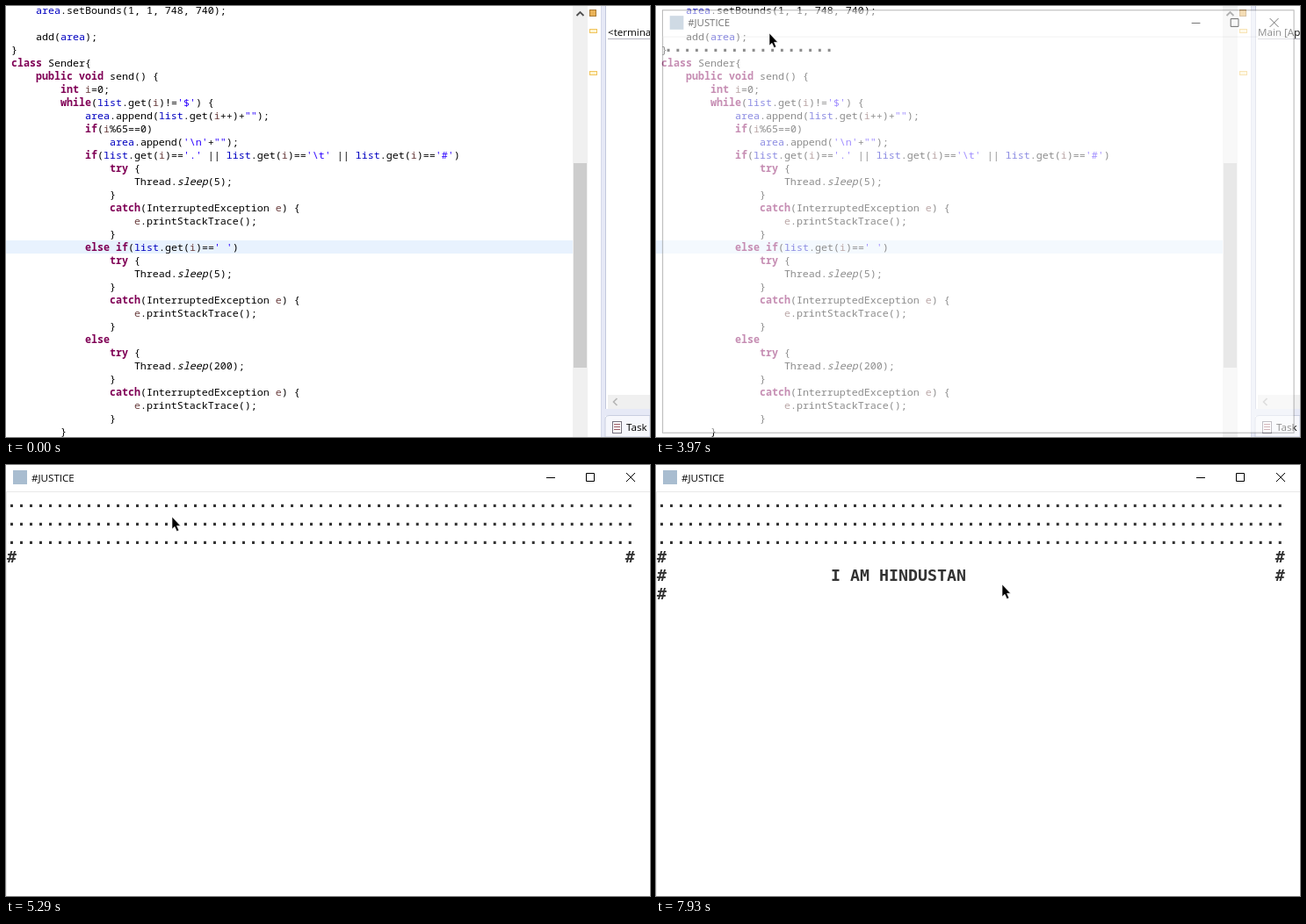
Write an HTML page that moves like this. It is 733x491 px and loops after 8 s.

```html
<!DOCTYPE html>
<html lang="en">
<head>
<meta charset="utf-8">
<title>Code run</title>
<style>
html, body { margin: 0; width: 100%; height: 100%; overflow: hidden; background: #fff; }
svg { display: block; width: 100%; height: 100%; }
text { white-space: pre; }
.code { font: 11.667px "Noto Sans Mono", "DejaVu Sans Mono", monospace; }
.key { font-weight: 700; fill: #7f0055; }
.str { fill: #2a00ff; }
.field { fill: #0000c0; }
.local { fill: #6a3e3e; }
.call { font-style: italic; }
.ui { font: 11.6px "Open Sans", "Noto Sans", sans-serif; }
.out { font: bold 18.27px "DejaVu Sans Mono", monospace; fill: #333; }
</style>
</head>
<body>
<svg viewBox="0 0 733 491" preserveAspectRatio="none">
  <rect width="733" height="491" fill="#fff"/>
  <rect y="267" width="645" height="15" fill="#e8f2fe"/>
  <g id="code" class="code"></g>
  <rect id="caret" x="125" y="267" width="2" height="15"/>

  <!-- editor scrollbar and ruler -->
  <rect x="645" width="17" height="491" fill="#f0f0f0"/>
  <rect x="646" y="179" width="15" height="233" fill="#cdcdcd"/>
  <path d="M649.5 11L653.5 7L657.5 11" fill="none" stroke="#505050" stroke-width="1.8"/>
  <rect x="664.5" y="4.5" width="7" height="7" fill="#eab358" stroke="#a87a35"/>
  <g fill="#fdf3cf" stroke="#f0c45c">
    <rect x="664.5" y="26.5" width="8" height="4"/>
    <rect x="664.5" y="74.5" width="8" height="4"/>
  </g>

  <!-- console and task panes -->
  <rect x="677" width="5" height="491" fill="#e6e9f6"/>
  <path d="M677.5 0V491" stroke="#d5d9ea"/>
  <path d="M682.5 0V460" stroke="#c3c8dc"/>
  <rect x="682" y="459" width="51" height="8" fill="#e6e9f6"/>
  <path d="M682 491V471Q682 466.500 687 466.500H733V491Z" fill="#f6f7fc" stroke="#c9cee0"/>
  <g id="console">
    <path d="M685 37.500H733" stroke="#b3b3bd"/>
    <rect x="685" y="443" width="48" height="16" fill="#f0f0f0"/>
    <path d="M695.500 447L691.500 451L695.500 455" fill="none" stroke="#b5b5b5" stroke-width="1.6"/>
  </g>
  <text id="label" class="ui" x="685"></text>
  <rect x="690.5" y="473.5" width="10" height="13" fill="#fff" stroke="#75707d"/>
  <path d="M692 476.500H699M692 479.500H699M692 482.500H699" stroke="#9a5a62"/>
  <text class="ui" x="706" y="484">Task</text>

  <g id="win">
    <rect x="-.5" y="-.5" width="734.500" height="492" fill="#fff" stroke="#777"/>
    <path d="M0 30.500H733M.5 30V491" fill="none" stroke="#e9e9e9"/>
    <rect x="8" y="6" width="16" height="16" fill="#a9bdd0"/>
    <text class="ui" x="29" y="18.500">#JUSTICE</text>
    <path d="M615 14.500H625M660.500 9.500H669.500V18.500H660.500ZM706 9L716 19M716 9L706 19" fill="none" stroke="#000"/>
    <g id="out" class="out"></g>
  </g>

  <path id="beam" d="M1 .5H3.500L4.500 1.500L5.500 .5H8M4.500 1V16M1 16.500H3.500L4.500 15.500L5.500 16.500H8" fill="none" stroke="#000"/>
  <path id="arrow" d="M0 0V14L3 11.300L5.400 16.500L7.800 15.500L5.500 10.300H9.600Z" stroke="#fff" stroke-width=".6"/>
</svg>
<script>
const LOOP = 8000, START = 650, TICK = 77.4, OPEN = 3970;
const $ = id => document.getElementById(id);
const NS = 'http://www.w3.org/2000/svg';
const add = (parent, tag, attrs, text = '') => {
  const el = parent.appendChild(document.createElementNS(NS, tag));
  for (const k in attrs) el.setAttribute(k, attrs[k]);
  el.textContent = text;
  return el;
};
const clamp = (v, lo, hi) => Math.min(hi, Math.max(lo, v));

const SOURCE = String.raw`    area.setBounds(1, 1, 748, 740);

    add(area);
}
class Sender{
    public void send() {
        int i=0;
        while(list.get(i)!='$') {
            area.append(list.get(i++)+"");
            if(i%65==0)
                area.append('\n'+"");
            if(list.get(i)=='.' || list.get(i)=='\t' || list.get(i)=='#')
                try {
                    Thread.sleep(5);
                }
                catch(InterruptedException e) {
                    e.printStackTrace();
                }
            else if(list.get(i)==' ')
                try {
                    Thread.sleep(5);
                }
                catch(InterruptedException e) {
                    e.printStackTrace();
                }
            else
                try {
                    Thread.sleep(200);
                }
                catch(InterruptedException e) {
                    e.printStackTrace();
                }
        }`;

const TOKEN = /(?<str>'\\?.'|"[^"]*")|(?<key>\b(?:class|public|void|int|while|if|else|try|catch)\b)|(?<field>\b(?:area|list)\b)|(?<local>\b[ie]\b)|(?<call>\bsleep\b)/g;

SOURCE.split('\n').forEach((line, row) => {
  const text = add($('code'), 'text', { x: 6, y: 9 + 15 * row });
  let at = 0;
  for (const m of line.matchAll(TOKEN)) {
    const kind = Object.keys(m.groups).find(k => m.groups[k] !== undefined);
    text.append(line.slice(at, m.index));
    add(text, 'tspan', { class: kind }, m[0]);
    at = m.index + m[0].length;
  }
  text.append(line.slice(at));
});

// Printed characters after the dots: time, row, column, character
const prints = [[4970, 3, 0, '#'], [5290, 3, 64, '#'], [5370, 4, 0, '#']];
const letterTimes = [5600, 5750, 5980, 6210, 6380, 6610, 6760, 6990, 7160, 7390, 7540, 7770];
let nextLetter = 0;
[...'I AM HINDUSTAN'].forEach((ch, i) => {
  if (ch !== ' ') prints.push([letterTimes[nextLetter++], 4, 18 + i, ch]);
});
prints.push([7930, 4, 64, '#'], [7930, 5, 0, '#']);

const rows = Array.from({ length: 6 }, (_, r) => add($('out'), 'text', { x: 1, y: 48 + 21 * r }));

const beamPath = [[650, 621, 438], [1110, 484, 273], [1430, 447, 240], [1730, 190, 1]];
const arrowPath = [[3970, 127, 30], [4430, 189, 62], [5289, 189, 62], [5290, 189, 59],
  [6529, 189, 59], [6530, 190, 59], [6990, 275, 84], [7159, 275, 84], [7930, 394, 136]];

function along(path, t) {
  const i = path.findIndex(p => p[0] > t);
  if (i < 0) return path[path.length - 1].slice(1);
  if (i === 0) return path[0].slice(1);
  const [t0, x0, y0] = path[i - 1], [t1, x1, y1] = path[i];
  const u = (t - t0) / (t1 - t0), e = u * (2 - u) * .4 + u * .6;
  return [x0 + (x1 - x0) * e, y0 + (y1 - y0) * e];
}

const show = (el, on) => el.setAttribute('visibility', on ? 'visible' : 'hidden');
function place(id, path, t, on) {
  const [x, y] = along(path, t).map(Math.round);
  $(id).setAttribute('transform', `translate(${x} ${y})`);
  show($(id), on);
}

function dotsAt(t) {
  const ticks = (t - OPEN) / TICK;
  return Math.round(ticks < 6 ? 16 + 91 * ticks / 6 : 107 + 14 * (ticks - 6));
}

function render(t) {
  // The screen refreshes in steps
  const step = Math.floor((t - START) / TICK + .2);
  const q = START + TICK * step;

  show($('caret'), t >= 3270 && t < 3820);
  place('beam', beamPath, q, (t >= 650 && t < 1110) || (t >= 1110 && t < 1800));
  if (t >= 1110 && t < 1430) place('beam', beamPath, 1110, true);

  const empty = t >= 3420 && t < 3650;
  show($('console'), !empty);
  $('label').textContent = empty ? 'No consoles' : t < 3420 ? '<terminated>' : 'Main [App]';
  $('label').setAttribute('y', empty ? 13 : 34);

  const open = t >= OPEN;
  show($('win'), open);
  place('arrow', arrowPath, q < OPEN ? OPEN : q, open);
  if (!open) return;

  const p = clamp((q - OPEN) / (2 * TICK), 0, 1), ease = 1 - (1 - p) ** 2;
  const s = .976 + .024 * ease;
  $('win').setAttribute('transform', `translate(366.5 245.5) scale(${s}) translate(-366.5 -245.5)`);
  $('win').setAttribute('opacity', .5 + .5 * ease);

  const dots = dotsAt(q);
  const lines = rows.map((_, r) => r < 3 ? '.'.repeat(clamp(dots - 65 * r, 0, 65)) : '');
  for (const [at, r, col, ch] of prints) {
    if (t >= at) lines[r] = lines[r].padEnd(col) + ch;
  }
  rows.forEach((el, r) => { if (el.textContent !== lines[r]) el.textContent = lines[r]; });
}

const begin = performance.now();
function tick() {
  render((performance.now() - begin) % LOOP);
  requestAnimationFrame(tick);
}
render(0);
requestAnimationFrame(tick);
</script>
</body>
</html>
```
